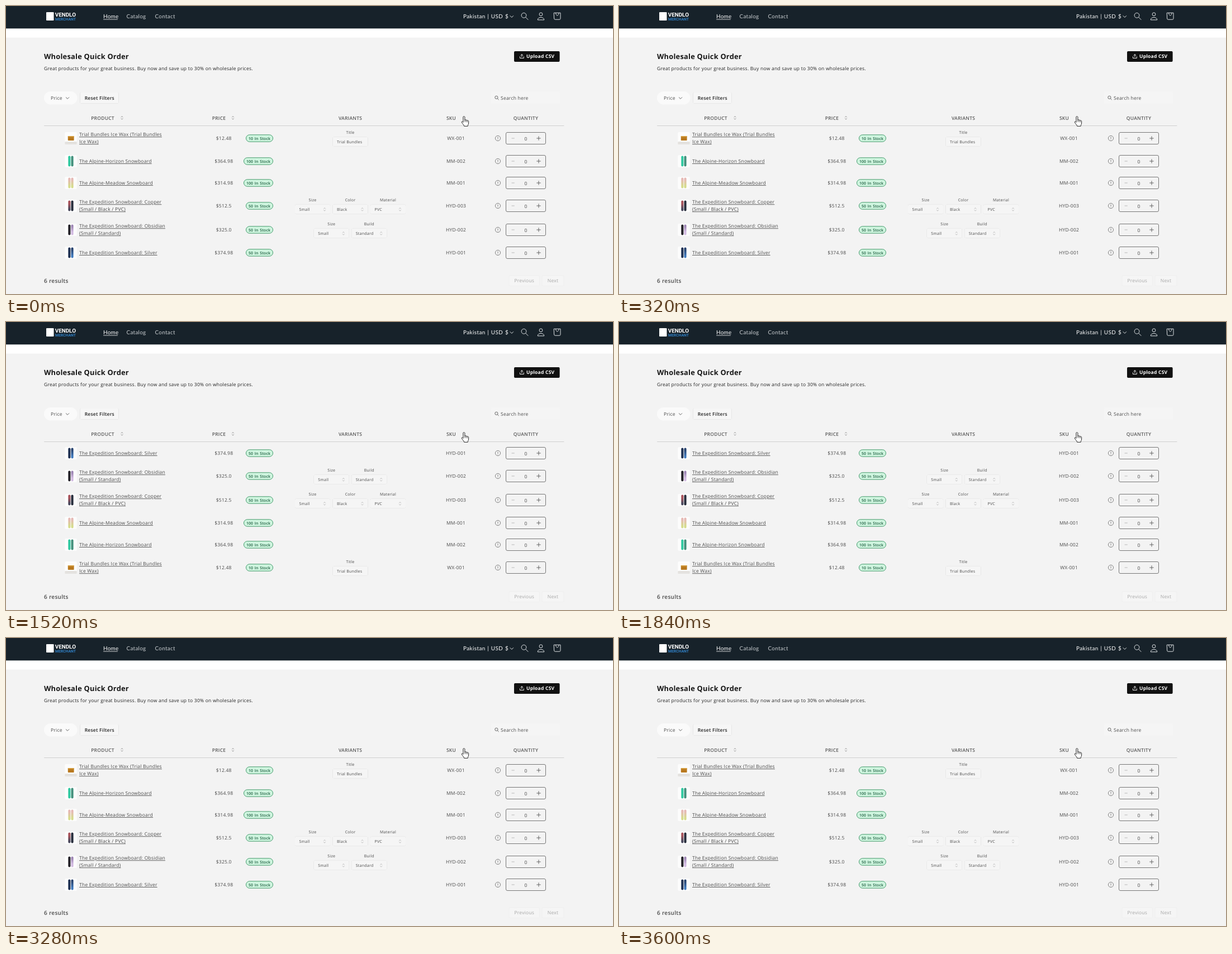
An HTML page that plays this animation: 1086 by 516 pixels, repeating every 4.4 s.

```html
<!DOCTYPE html>
<html lang="en">
<head>
<meta charset="utf-8">
<title>Wholesale Quick Order</title>
<style>
  html, body { margin: 0; width: 100%; height: 100%; overflow: hidden; background: #f3f3f3; }
  svg { display: block; width: 100vw; height: 100vh; }
  text {
    font: 8.5px "Open Sans", "Noto Sans", sans-serif;
    letter-spacing: .235px; fill: #4b4b4b; text-rendering: geometricPrecision;
  }
  .nav { font: 9.9px Lato, sans-serif; letter-spacing: .3px; fill: #c9cdd0; }
  .region { letter-spacing: .42px; word-spacing: .7px; }
  .light { fill: #fff; }
  .brand { font: 700 9.9px Roboto, sans-serif; letter-spacing: 0; fill: #fff; }
  .tagline { font: 700 6.8px Roboto, sans-serif; letter-spacing: 0; fill: #2f7fc4; }
  .title { font-size: 12.8px; font-weight: 700; letter-spacing: .25px; fill: #161616; }
  .dark { fill: #222; }
  .bold { font-weight: 700; }
  .semi { font-weight: 600; }
  .head { font-weight: 600; fill: #5a5a5a; }
  .link { text-decoration: underline; }
  .badge { font-size: 6.8px; font-weight: 600; letter-spacing: .2px; word-spacing: .7px; fill: #17583a; }
  .small { font-size: 7px; letter-spacing: .25px; }
  .results { font-size: 10px; font-weight: 600; letter-spacing: .3px; }
  .off { font-weight: 500; fill: #a6a6a6; }
  .mid { text-anchor: middle; }
  .line { fill: none; stroke-linecap: round; stroke-linejoin: round; }
  .soft { filter: drop-shadow(.2px .6px .6px rgba(0, 0, 0, .22)); }
</style>
</head>
<body>
<svg id="stage" viewBox="0 0 1086 516">
  <defs>
    <linearGradient id="sunset" x2="0" y2="1">
      <stop offset=".2" stop-color="#e6b9b4"/><stop offset=".8" stop-color="#d5dc8b"/>
    </linearGradient>
    <linearGradient id="ember" x2="0" y2="1">
      <stop offset=".3" stop-color="#a8525a"/><stop offset=".8" stop-color="#48475c"/>
    </linearGradient>
    <linearGradient id="lilac" x2="0" y2="1">
      <stop offset=".2" stop-color="#9d85b4"/><stop offset=".7" stop-color="#d3bbe2"/>
    </linearGradient>
    <linearGradient id="wave" x2="0" y2="1">
      <stop offset=".2" stop-color="#26426f"/><stop offset=".8" stop-color="#3d78bd"/>
    </linearGradient>
  </defs>
</svg>
<script>
const LOOP = 4400, ASCENDING_AT = 1520, DESCENDING_AT = 3280;
const TABLE_TOP = 215.2, TALL = 43.3, SHORT = 38.8;

const products = [
  { name: ['Trial Bundles Ice Wax (Trial Bundles', 'Ice Wax)'], price: '$12.48', stock: 10, sku: 'WX-001',
    variants: [['Title', 'Trial Bundles']] },
  { name: ['The Alpine-Horizon Snowboard'], price: '$364.98', stock: 100, sku: 'MM-002',
    boards: ['#2fc9a0', '#43907c'] },
  { name: ['The Alpine-Meadow Snowboard'], price: '$314.98', stock: 100, sku: 'MM-001',
    boards: ['url(#sunset)', 'url(#sunset)'] },
  { name: ['The Expedition Snowboard: Copper', '(Small / Black / PVC)'], price: '$512.5', stock: 50, sku: 'HYD-003',
    boards: ['url(#ember)', '#272d3c'], variants: [['Size', 'Small'], ['Color', 'Black'], ['Material', 'PVC']] },
  { name: ['The Expedition Snowboard: Obsidian', '(Small / Standard)'], price: '$325.0', stock: 50, sku: 'HYD-002',
    boards: ['#242229', 'url(#lilac)'], variants: [['Size', 'Small'], ['Build', 'Standard']] },
  { name: ['The Expedition Snowboard: Silver'], price: '$374.98', stock: 50, sku: 'HYD-001',
    boards: ['#1f3153', 'url(#wave)'] },
];

const text = (x, y, value, cls = '') => `<text x="${x}" y="${y}" class="${cls}">${value}</text>`;
const rect = (x, y, w, h, r, fill, extra = '') =>
  `<rect x="${x}" y="${y}" width="${w}" height="${h}" rx="${r}" fill="${fill}" ${extra}/>`;
const line = (d, color, width = 1) => `<path class="line" d="${d}" stroke="${color}" stroke-width="${width}"/>`;
const circle = (x, y, r, color, width = 1) =>
  `<circle cx="${x}" cy="${y}" r="${r}" fill="none" stroke="${color}" stroke-width="${width}"/>`;
const sorter = (x, y, color = '#777') =>
  line(`M${x - 1.4} ${y - 1.3}l1.4-1.5 1.4 1.5M${x - 1.4} ${y + 1.3}l1.4 1.5 1.4-1.5`, color, .8);

function header() {
  return rect(0, 40, 1086, 16.7, 0, '#fff') + rect(0, 0, 1086, 40.3, 0, '#17222a') +
    rect(72, 11, 13.5, 15, 1, '#fff') +
    text(87.7, 19.3, 'VENDLO', 'brand') + text(88, 26.3, 'MERCHANT', 'tagline') +
    text(174, 22, 'Home', 'nav light') + line('M174.5 24H199.5', '#fff', .8) +
    text(215.5, 22, 'Catalog', 'nav') + text(266.5, 22, 'Contact', 'nav') +
    text(818, 21.7, 'Pakistan | USD $', 'nav region light') +
    line('M902 17.6l2.8 2.8 2.8-2.8', '#dfe2e4') +
    circle(926.5, 16.8, 4.4, '#dfe2e4') + line('M929.8 20.2L934 24.5', '#dfe2e4') +
    circle(957, 14.8, 2.9, '#dfe2e4') +
    line('M951.2 24.5C951.2 18.9 962.8 18.9 962.8 24.5Z', '#dfe2e4') +
    line('M980.6 12.3H992V22.4Q992 24.2 990.2 24.2H982.4Q980.6 24.2 980.6 22.4ZM983.6 12.5C983.6 18.6 989 18.6 989 12.5', '#dfe2e4');
}

function toolbar() {
  return text(68, 94.8, 'Wholesale Quick Order', 'title') +
    text(68, 115, 'Great products for your great business. Buy now and save up to 30% on wholesale prices.', 'dark') +
    rect(909, 81, 81.6, 19, 2, '#111') +
    line('M919.5 90.7V93.5H926.3V90.7M922.9 91.3V86.8M920.9 88.6l2-2 2 2', '#fff', .9) +
    text(931, 93.3, 'Upload CSV', 'bold light') +
    rect(68, 153, 59.5, 23.5, 11.7, '#fafafa') + text(80, 168, 'Price') +
    line('M107.3 163.7l2.7 2.7 2.7-2.7', '#555', .9) +
    rect(132.5, 155, 69, 19.5, 2, '#f6f6f6', 'class="soft"') + text(140.7, 168, 'Reset Filters', 'semi dark') +
    rect(868, 153.5, 123, 21, 2, '#f5f5f5') +
    circle(877.4, 163.8, 2.6, '#555', .9) + line('M879.4 165.8l2 2', '#555', .9) +
    text(885, 168.2, 'Search here');
}

function tableHead() {
  const columns = [['PRODUCT', 173], ['PRICE', 381], ['VARIANTS', 616], ['SKU', 796.5], ['QUANTITY', 930]];
  return columns.map(([label, x]) => text(x, 203.6, label, 'head mid')).join('') +
    [207.5, 406, 819].map(x => sorter(x, 200.4)).join('') +
    line('M68.5 214.5H998', '#cfcfcf');
}

function footer() {
  return text(68, 495.8, '6 results', 'results') +
    rect(900, 483, 54.5, 18.5, 2, '#f5f5f5', 'stroke="#efefef"') + text(927.3, 495.3, 'Previous', 'off mid') +
    rect(959, 483, 39, 18.5, 2, '#f5f5f5', 'stroke="#efefef"') + text(978.5, 495.3, 'Next', 'off mid');
}

function thumbnail(boards) {
  const card = rect(105.3, -11, 21.5, 22, 2, '#fcfcfc');
  if (!boards) {
    return card + rect(105.3, 6, 21.5, 5, 1, '#e4e2df') +
      rect(110.8, -4, 10.8, 8, .7, '#b9791f') + rect(110.8, -4, 10.8, 2, .7, '#d29a3a');
  }
  return card + boards.map((fill, i) => rect(111.3 + i * 5.2, -9.5, 4.1, 19, 2, fill)).join('');
}

// Rows are drawn around y = 0, their vertical centre.
function productRow({ name, price, stock, sku, boards, variants = [] }) {
  const twoLines = name.length > 1;
  const names = name.map((part, i) => text(131, twoLines ? -3.7 + i * 13 : 3, part, 'link')).join('');
  const badgeX = stock > 99 ? 425.5 : 429.5;
  const options = variants.map(([label, value], i) => {
    const x = 616 + (i - (variants.length - 1) / 2) * 67.5;
    return text(x, -7.7, label, 'small mid') +
      rect(x - 31.5, -2.3, 63, 16.5, 2, '#f5f5f5', 'class="soft"') +
      text(x - 24, 8.8, value, 'small') +
      (label === 'Title' ? '' : sorter(x + 21.5, 6.4, '#aaa'));
  }).join('');
  return '<g class="row">' + thumbnail(boards) + names +
    text(389.7, 3, price, 'mid') +
    rect(badgeX, -6.2, 477.5 - badgeX, 12.4, 6.2, '#cff5df', 'stroke="#35905f" stroke-width=".9"') +
    text((badgeX + 477.5) / 2, 2.5, `${stock} In Stock`, 'badge mid') + options +
    text(805, 3, sku, 'mid') +
    circle(880, 0, 4.6, '#777', .9) + line('M880-2.2V.4M880 2.2v.1', '#777', .9) +
    rect(894.5, -10.5, 71, 21, 2.5, 'none', 'stroke="#777"') +
    line('M905 0h4.4', '#b0b0b0', .9) + text(930, 3.5, '0', 'mid') +
    line('M949.7 0h6.6M953-3.3v6.6', '#555', .9) + '</g>';
}

const cursor = `<path d="M818 199.3c0-2 2.9-2 2.9 0v5.2c.3-1.2 2.3-1 2.3.4.4-1 2.2-.7 2.2.6.5-.8 2.2-.4 2.2 1v3.4c0 2.2-1.5 3-1.5 5.4h-6.4c0-2-2.8-4-4.3-6.6-.9-1.6 1-2.5 2.6-.3Z"
  fill="#fff" stroke="#222" stroke-width="1" stroke-linejoin="round"/>` +
  line('M820.9 204.5v3M823.2 205v2.7M825.4 205.7v2.3', '#222', .7);

const stage = document.getElementById('stage');
stage.insertAdjacentHTML('beforeend',
  header() + toolbar() + tableHead() + products.map(productRow).join('') + footer() + cursor);
const rows = [...stage.querySelectorAll('.row')];

function arrange(ascending) {
  const order = products.map((_, i) => ascending ? products.length - 1 - i : i);
  let top = TABLE_TOP;
  for (const i of order) {
    const height = products[i].name.length > 1 ? TALL : SHORT;
    rows[i].setAttribute('transform', `translate(0 ${Math.round(top + height / 2)})`);
    top += height;
  }
}

const start = performance.now();
let shown;
function tick() {
  const t = (performance.now() - start) % LOOP;
  const ascending = t >= ASCENDING_AT && t < DESCENDING_AT;
  if (ascending !== shown) arrange(shown = ascending);
  requestAnimationFrame(tick);
}
tick();
</script>
</body>
</html>
```
